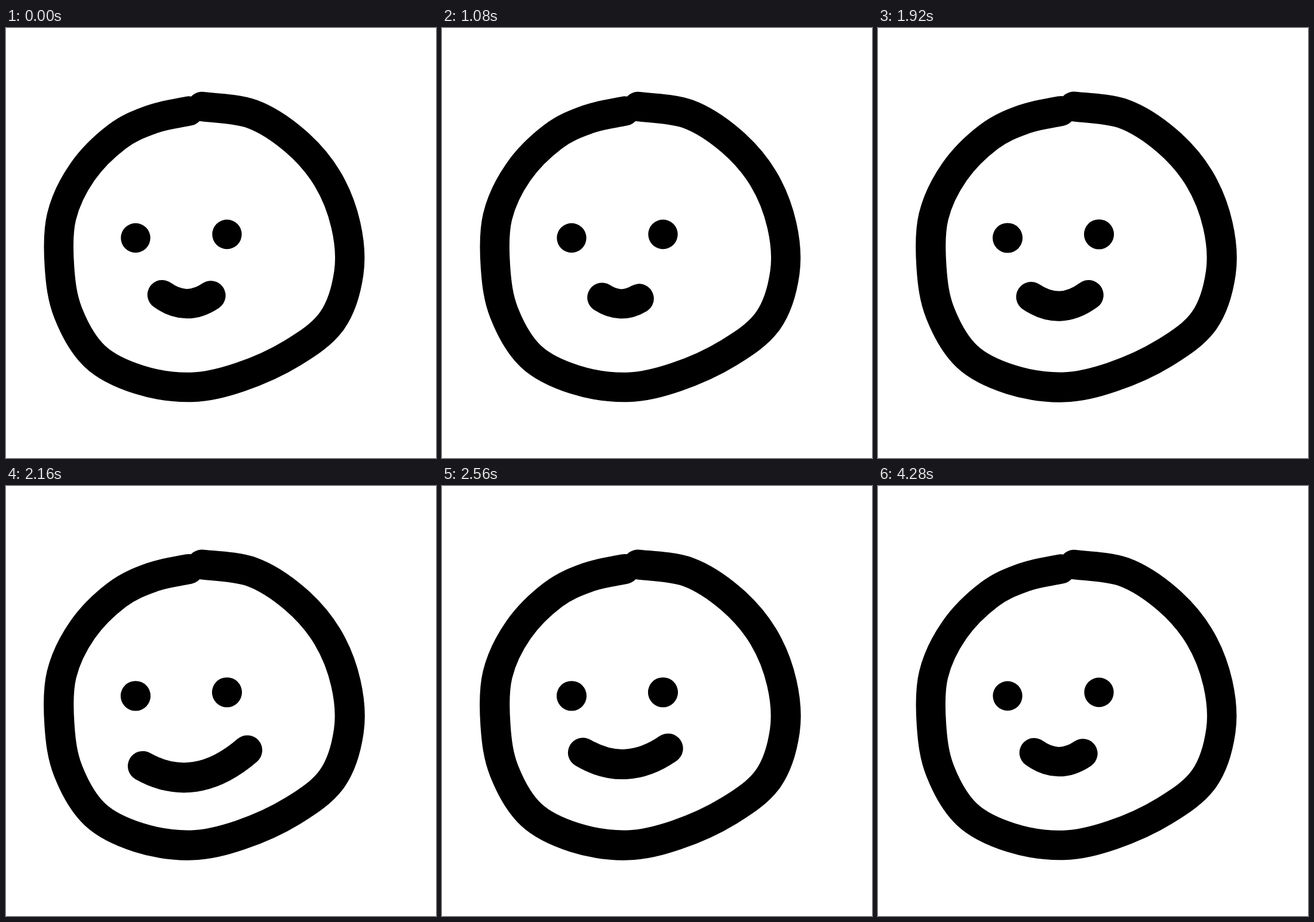
An HTML page for the animation above (4.52 s loop, 720 px wide and 720 px high).

```html
<!DOCTYPE html>
<html lang="en">
<head>
<meta charset="utf-8">
<title>Smiling face</title>
<style>
html, body { margin: 0; width: 100%; height: 100%; overflow: hidden; background: #fff; }
svg { display: block; width: 100vw; height: 100vh; }
path { fill: none; stroke: #000; stroke-linecap: round; stroke-linejoin: round; }
</style>
</head>
<body>
<svg viewBox="0 0 720 720">
  <g id="pen">
    <path id="head"/>
    <path id="eyes" d="M217 351.5h.01M370 345.5h.01"/>
    <path id="mouth"/>
  </g>
</svg>
<script>
const LOOP = 4520, STEP = 40;
const $ = id => document.getElementById(id);
const within = (t, from, to) => t >= from && t < to;
const ease = u => u * u * (3 - 2 * u);

// Key points of the hand-drawn head, clockwise from the top
const outline = [
  [328, 131.5], [412, 144], [484, 189], [538, 252], [569, 330], [574, 410],
  [546, 490], [480, 544], [392, 584.5], [310, 601.5], [222, 588.5], [149, 550],
  [104, 477], [89.5, 400], [93, 316], [128, 241], [186, 182], [244, 153], [306, 139]
];

// Catmull-Rom curve through the points
function smooth(p) {
  let d = "M" + p[0];
  for (let i = 0; i < p.length - 1; i++) {
    const a = p[i], b = p[i + 1], before = p[i - 1] || a, after = p[i + 2] || b;
    const c1 = a.map((v, k) => v + (b[k] - before[k]) / 6);
    const c2 = b.map((v, k) => v - (after[k] - a[k]) / 6);
    d += "C" + [c1, c2, b];
  }
  return d;
}

// Mouth: left end, right end and how far the curve sags between them
const rest = [261.5, 446.7, 343, 448, 19];
const dot = [282, 461, 302, 464, 0];
const small = [270.5, 454, 323.5, 456, 8];
const grin = [229, 469, 404, 442.5, 41.5];
const smile = [236, 446.5, 378.5, 439.5, 30.5];
const closing = [259.5, 457.5, 363, 448.5, 20];

// Each move: start, end, mouth reached
const moves = [
  [960, 1280, dot], [1560, 1600, small], [1640, 1720, rest], [1840, 2160, grin],
  [2200, 2360, smile], [4040, 4080, closing], [4120, 4280, rest]
];

function mouthAt(t) {
  let pose = rest;
  for (const [from, to, next] of moves) {
    const u = ease(Math.min(1, Math.max(0, (t - from) / (to - from))));
    pose = pose.map((v, k) => v + (next[k] - v) * u);
  }
  return pose;
}

function mouthPath([x0, y0, x1, y1, sag]) {
  const handle = u => [x0 + (x1 - x0) * u, y0 + (y1 - y0) * u + sag];
  return `M${x0} ${y0}C${[handle(1 / 3), handle(2 / 3), x1, y1]}`;
}

function draw(now) {
  const t = Math.floor(now % LOOP / STEP) * STEP;
  const blink = within(t, 800, 960) || within(t, 2480, 2560);
  $("mouth").setAttribute("d", mouthPath(mouthAt(t)));
  $("eyes").style.display = blink ? "none" : "";
  $("pen").setAttribute("stroke-width", within(t, 1880, 4080) ? 50.2 : 49.4);
}

$("head").setAttribute("d", smooth(outline));
const start = performance.now();
function frame() {
  draw(performance.now() - start);
  requestAnimationFrame(frame);
}
frame();
</script>
</body>
</html>
```
